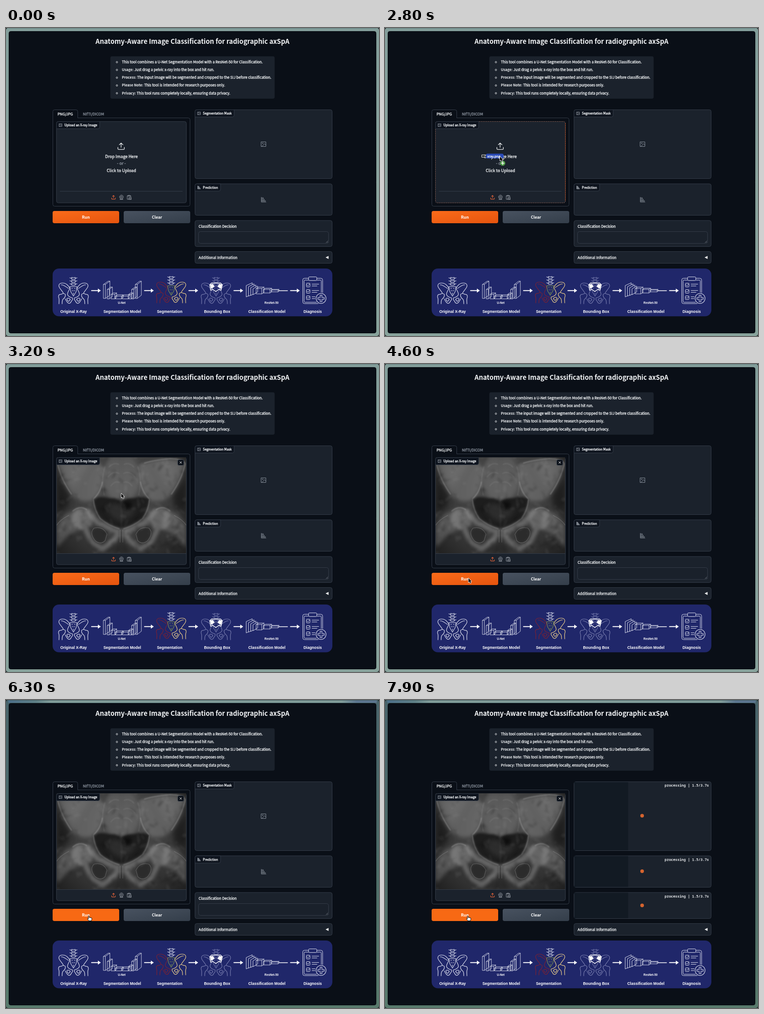
An HTML page with a canvas that plays this animation: 824x680 px, repeating every 8 s.

```html
<!DOCTYPE html>
<html lang="en">
<head>
<meta charset="utf-8">
<title>Image classification demo</title>
<style>
html, body { margin: 0; width: 100%; height: 100%; overflow: hidden; background: #0a0f17; }
canvas { display: block; width: 824px; height: 680px; }
</style>
</head>
<body>
<canvas id="stage" width="824" height="680"></canvas>
<script>
const canvas = document.getElementById('stage');
const ctx = canvas.getContext('2d');
const LOOP = 8000, STEP = 100;
const INK = '#f3f5f7', GREY = '#8b939e', BG = '#0a0f17', PANEL = '#1b222c', LINE = '#343c48', ORANGE = '#e2633a';
const NAVY = '#20276a', CHALK = '#dfe2f0';
const SANS = '"Noto Sans CJK JP", "Noto Sans CJK SC", "Noto Sans CJK", "Open Sans", sans-serif';
const MONO = '"Noto Sans Mono", "DejaVu Sans Mono", monospace';
const ARIAL = '"Liberation Sans", Arial, sans-serif';
const TITLE = 'Anatomy-Aware Image Classification for radiographic axSpA';

// Ratio between the UI type scale and the em size of the installed face
function emRatio(weight, sample, ems) {
  ctx.font = `${weight} 100px ${SANS}`;
  return ems * 100 / ctx.measureText(sample).width;
}
const RATIO = {
  500: emRatio(500, 'This tool runs completely locally, ensuring data privacy.', 23.18),
  600: emRatio(600, TITLE, 25.6)
};

const clamp = v => Math.max(0, Math.min(1, v));
const span = (t, a, b) => clamp((t - a) / (b - a));
const mix = (a, b, p) => a + (b - a) * p;
const easeOut = p => 1 - (1 - p) * (1 - p);
const easeInOut = p => p * p * (3 - 2 * p);

// A hairline outline gives light type its medium weight
function write(s, x, y, font, color, align, outline = 0) {
  ctx.font = font;
  ctx.fillStyle = ctx.strokeStyle = color;
  ctx.textAlign = align;
  ctx.fillText(s, x, y);
  if (!outline) return;
  ctx.lineWidth = outline;
  ctx.lineJoin = 'round';
  ctx.strokeText(s, x, y);
}
function text(s, x, y, size, color = INK, align = 'left', weight = 500) {
  write(s, x, y, `${weight} ${size * RATIO[weight]}px ${SANS}`, color, align, weight === 500 ? 0.35 : 0);
  return ctx.measureText(s).width;
}
function box(x, y, w, h, r, fill, stroke) {
  ctx.beginPath();
  ctx.roundRect(x, y, w, h, r);
  if (fill) { ctx.fillStyle = fill; ctx.fill(); }
  if (stroke) { ctx.strokeStyle = stroke; ctx.lineWidth = 1; ctx.stroke(); }
}
function disc(x, y, r, fill) {
  ctx.beginPath();
  ctx.arc(x, y, r, 0, 7);
  ctx.fillStyle = fill;
  ctx.fill();
}
function draw(d, x, y, scale, color, width, fill) {
  const p = new Path2D(d);
  ctx.save();
  ctx.translate(x, y);
  ctx.scale(scale, scale);
  ctx.lineJoin = ctx.lineCap = 'round';
  if (fill) { ctx.fillStyle = fill; ctx.fill(p); }
  if (color) { ctx.strokeStyle = color; ctx.lineWidth = width / scale; ctx.stroke(p); }
  ctx.restore();
}
const ICON = {
  upload: 'M21 15v4a2 2 0 0 1-2 2H5a2 2 0 0 1-2-2v-4M17 8l-5-5-5 5M12 3v12',
  image: 'M3 3h18v18H3zM7 8.5a1.5 1.5 0 1 0 3 0a1.5 1.5 0 1 0-3 0M21 15l-5-5L5 21',
  chart: 'M3 2v20h19M3 4h8v4H3M3 10h12v4H3M3 16h17v3H3',
  webcam: 'M3 10a9 9 0 1 0 18 0a9 9 0 1 0-18 0M8 10a4 4 0 1 0 8 0a4 4 0 1 0-8 0M7 18l-2 4h14l-2-4',
  paste: 'M8 4H3v17h7M16 4h4v6M8 2h8v4H8zM12 12h10v10H12zM12 20l4-4 5 5'
};
function icon(name, x, y, size, color, width = 0.9) {
  const k = size / 24;
  draw(ICON[name], x - size / 2, y - size / 2, k, color, width);
}

// X-ray picture, mirrored about the spine
function makeXray() {
  const c = document.createElement('canvas');
  c.width = 286; c.height = 212;
  const g = c.getContext('2d');
  const base = g.createRadialGradient(143, 60, 10, 143, 90, 185);
  base.addColorStop(0, '#525252');
  base.addColorStop(0.6, '#3a3a3a');
  base.addColorStop(1, '#202020');
  g.fillStyle = base;
  g.fillRect(0, 0, 286, 212);
  const both = (d, fill, stroke, width, blur) => {
    const p = new Path2D(d);
    g.filter = `blur(${blur}px)`;
    for (const side of [-1, 1]) {
      g.save();
      g.translate(143, 0);
      g.scale(side, 1);
      if (fill) { g.fillStyle = fill; g.fill(p); }
      if (stroke) { g.strokeStyle = stroke; g.lineWidth = width; g.stroke(p); }
      g.restore();
    }
  };
  const wing = 'M38 18Q65 6 108 3Q136 4 141 14Q134 48 110 82Q90 104 62 94Q46 80 42 54Z';
  const cavity = 'M0 98Q10 90 26 90Q46 84 62 92Q58 116 46 134Q26 150 0 156Z';
  const head = 'M62 136a24 24 0 1 0 48 0a24 24 0 1 0-48 0';
  const hole = 'M32 170Q40 152 60 156Q72 166 58 184Q46 194 36 184Z';
  both('M143 45L114 84L116 108L143 122Z', 'rgba(18,18,18,.6)', null, 0, 6);
  both(wing, 'rgba(150,150,150,.38)', null, 0, 4);
  both('M70 12Q104 6 136 12Q126 44 104 70Q92 40 70 12', 'rgba(160,160,160,.2)', null, 0, 8);
  both('M0 0H26L44 34L38 70L20 94H0Z', 'rgba(150,150,150,.24)', null, 0, 4);
  both('M92 112L124 126L143 150V200L118 172L90 158Z', 'rgba(150,150,150,.36)', null, 0, 4);
  both(head, 'rgba(160,160,160,.4)', null, 0, 3);
  both('M4 165L28 156L54 143L76 116M6 168L20 186L42 202L66 186L80 158', null, 'rgba(150,150,150,.45)', 11, 3);
  both(cavity, '#1d1d1d', null, 0, 2.5);
  both('M0 104Q18 98 32 112Q22 136 0 142Z', 'rgba(80,80,80,.35)', null, 0, 6);
  both(hole, '#2b2b2b', null, 0, 3);
  both('M0 182L14 196L20 212H0Z', 'rgba(30,30,30,.6)', null, 0, 4);
  both('M62 93Q60 116 47 135Q28 151 4 158M50 13Q72 6 108 3Q137 4 141 14Q134 48 110 82M76 116Q92 105 108 119M42 54Q46 78 62 92', null, 'rgba(205,205,205,.42)', 1.6, 0.8);
  both(hole + 'M3 160V188M116 128Q136 138 143 150', null, 'rgba(190,190,190,.28)', 1.2, 0.7);
  both('M5 16Q17 10 28 22M4 36Q18 28 30 44M4 56Q14 50 24 64M36 20Q46 50 38 84', null, 'rgba(190,190,190,.16)', 2, 1.2);
  g.filter = 'blur(4px)';
  g.fillStyle = '#0d0d0d';
  g.beginPath();
  g.ellipse(156, 106, 12, 10, 0, 0, 7);
  g.fill();
  // Soft seeded mottling
  g.filter = 'blur(2px)';
  let seed = 7;
  const rand = () => (seed = seed * 16807 % 2147483647) / 2147483647;
  for (let i = 0; i < 240; i++) {
    g.fillStyle = i % 2 ? 'rgba(210,210,210,.07)' : 'rgba(0,0,0,.12)';
    g.beginPath();
    g.ellipse(rand() * 286, rand() * 212, 2 + rand() * 8, 1 + rand() * 3, rand() * 3, 0, 7);
    g.fill();
  }
  return c;
}
const xray = makeXray();

function backdrop(focused) {
  ctx.fillStyle = '#1a2427';
  ctx.fillRect(0, 0, 824, 680);
  const wall = ctx.createLinearGradient(0, 0, 0, 680);
  wall.addColorStop(0, focused ? '#48636a' : '#829d9a');
  wall.addColorStop(0.5, focused ? '#4d6b68' : '#8ba49f');
  wall.addColorStop(1, focused ? '#587a6c' : '#87a29b');
  box(0, 0, 824, 680, 5, wall);
  if (focused) {
    const sky = ctx.createLinearGradient(0, 0, 824, 0);
    sky.addColorStop(0.01, '#4d708b');
    sky.addColorStop(0.08, '#5f8087');
    sky.addColorStop(0.12, '#829d9a');
    sky.addColorStop(0.9, '#829d9a');
    sky.addColorStop(0.94, '#5c7590');
    ctx.fillStyle = sky;
    ctx.fillRect(5, 1, 814, 5);
  }
  ctx.fillStyle = focused ? '#3f585c' : '#5f7a7b';
  ctx.fillRect(5, 0, 814, 1);
  box(6.5, 7.5, 811, 666, 4, BG, '#04070c');
}

function intro() {
  text(TITLE, 412, 34.5, 16.75, INK, 'center', 600);
  box(230.5, 62.5, 363, 93.5, 4, PANEL);
  const rows = [
    ['', 'This tool combines a U-Net Segmentation Model with a ResNet-50 for Classification.'],
    ['Usage:', ' Just drag a pelvic x-ray into the box and hit run.'],
    ['Process:', ' The input image will be segmented and cropped to the SIJ before classification.'],
    ['Please Note:', ' This tool is intended for research purposes only.'],
    ['Privacy:', ' This tool runs completely locally, ensuring data privacy.']
  ];
  rows.forEach(([head, body], i) => {
    const y = 78 + i * 17.15;
    ctx.beginPath();
    ctx.arc(245, y - 2.6, 1.7, 0, 7);
    ctx.strokeStyle = INK;
    ctx.lineWidth = 0.9;
    ctx.stroke();
    const w = text(head, 256, y, 8.93, INK, 'left', 600);
    text(body, 256 + w, y, 8.93);
  });
}

function label(s, name, x, y, w) {
  box(x, y, w, 16, [4, 0, 4, 0], '#0e141e', LINE);
  icon(name, x + 9, y + 8, 8, '#a3a9b2', 0.8);
  text(s, x + 17.5, y + 10.8, 7.7);
}

// Corner-to-corner gradient, as CSS "to bottom right" lays it out
function button(s, x, y, from, to) {
  const w = 147, h = 27, k = w * h / (w * w + h * h) / 2;
  const cx = x + w / 2, cy = y + h / 2;
  const g = ctx.createLinearGradient(cx - h * k * 2, cy - w * k * 2, cx + h * k * 2, cy + w * k * 2);
  g.addColorStop(0, from);
  g.addColorStop(1, to);
  box(x, y, w, h, 4, g);
  text(s, cx, y + 17.3, 10.2, '#fff', 'center', 600);
}

function inputSide(state, hover, focused) {
  const height = { empty: 180, loading: 25, ready: 237 }[state];
  const end = 206 + height;
  ctx.strokeStyle = LINE;
  ctx.lineWidth = 1;
  ctx.beginPath();
  ctx.roundRect(103.5, 180.5, 55, 22, [4, 4, 0, 0]);
  ctx.stroke();
  box(103.5, 198.5, 303, end - 191, [0, 4, 4, 4], BG, LINE);
  ctx.fillStyle = BG;
  ctx.fillRect(104, 197, 54, 3);
  text('PNG/JPG', 114, 192.7, 8.93);
  text('NIfTI/DICOM', 170, 192.7, 8.93, GREY);

  box(111.5, 206.5, 287, height - 0.5, 4, PANEL, hover ? null : LINE);
  if (state === 'empty') {
    icon('upload', 254.3, 261, 19, INK, 1.3);
    text('Drop Image Here', 255, 286.6, 10.2, INK, 'center');
    text('- or -', 255, 302.2, 10.2, GREY, 'center');
    text('Click to Upload', 255, 317.6, 10.2, INK, 'center');
    ctx.fillStyle = LINE;
    ctx.fillRect(119, 360, 271, 1);
  }
  if (state === 'ready') {
    ctx.drawImage(xray, 112, 206);
    ctx.fillStyle = LINE;
    ctx.fillRect(112, 418, 286, 1);
  }
  if (hover) {
    ctx.setLineDash([2.5, 1.5]);
    box(111.5, 206.5, 287, height - 0.5, 4, null, '#8f6558');
    ctx.beginPath();
    ctx.moveTo(398.5, 210);
    ctx.lineTo(398.5, end - 4);
    ctx.strokeStyle = '#ea642d';
    ctx.stroke();
    ctx.setLineDash([]);
  }
  label('Upload an X-ray Image', 'image', 111.5, 206.5, 95.5);
  icon('upload', 237.5, end - 12.3, 11, ORANGE, 1.1);
  icon('webcam', 255, end - 12, 11, '#a3a9b2');
  icon('paste', 272, end - 12, 11, '#a3a9b2');
  if (state !== 'empty') {
    box(379.5, 211.5, 13, 12, 2.5, '#0b1018', LINE);
    draw('M-2-2L2 2M2-2L-2 2', 386, 217.5, 1, INK, 1);
  }
  button('Run', 103, end + 18, focused ? '#f76914' : '#fa6b1a', focused ? '#f76914' : '#e5540e');
  button('Clear', 260, end + 18, '#485260', '#343e4a');
}

function progress(y, h, iconY, elapsed) {
  box(417.5, y, 303, h, 4, PANEL, LINE);
  ctx.fillStyle = '#121a23';
  ctx.fillRect(418, y + 0.5, 302 * elapsed / 3.7, h - 1);
  write(`processing | ${elapsed.toFixed(1)}/3.7s`, 715.5, y + 10.5, `500 7.75px ${MONO}`, INK, 'right', 0.3);
  disc(568, iconY, 4, '#d5642f');
}

function outputSide(elapsed) {
  if (elapsed > 0) {
    progress(180.5, 152, 255.5, elapsed);
    progress(344, 69.5, 378, elapsed);
    progress(425, 57.5, 453.5, elapsed);
  } else {
    box(417.5, 180.5, 303, 152, 4, PANEL, LINE);
    label('Segmentation Mask', 'image', 417.5, 180.5, 86.5);
    icon('image', 569, 256.5, 13.5, GREY, 1);
    box(417.5, 344, 303, 69.5, 4, PANEL, LINE);
    label('Prediction', 'chart', 417.5, 344, 56.5);
    icon('chart', 569, 379, 13, GREY, 0.8);
    box(417.5, 425, 303, 57.5, 4, PANEL, LINE);
    text('Classification Decision', 425.5, 440.6, 8.97);
    box(425.5, 449.5, 287, 26, 4, '#1a212b', LINE);
    draw('M707 474l4-4M709.5 474l1.5-1.5', 0, 0, 1, '#8a9099', 0.7);
  }
  box(417.5, 493.5, 303, 26, 4, PANEL, LINE);
  text('Additional Information', 425.5, 509.6, 8.97);
  draw('M712.5 503.2V510L706 506.6Z', 0, 0, 1, null, 0, '#fff');
}

const WING = 'M8-6C12-12 16-17 24-17C31-17 34-13 31-7C28-2 24 1 22 6M8-6C9 0 14 3 13 9M11-5C16-8 21-13 27-13';
const RING = 'M13 9C11 13 6 15 2 16V20C4 21 5 25 7 27C11 30 15 25 18 18M7 19C11 15 16 16 14 20C12 25 9 24 7 19';
const FEMUR = 'M22 6C25 6 27 9 29 8C33 8 34 13 32 17C31 21 32 25 32 29M18 11C18 16 22 17 24 20C25 23 25 26 25 29M22 6C18 7 17 9 18 11';
const SACRUM = 'M-8-9H8L6 2L0 12L-6 2ZM-4-5h2M2-5h2M-3 0h2M1 0h2M0 5v3';
function pelvis(x, y, left, right, spine, sacrum) {
  for (const [side, color] of [[-1, left], [1, right]]) {
    ctx.save();
    ctx.translate(x, y);
    ctx.scale(side, 1);
    draw(WING + RING + FEMUR, 0, 0, 1, color, 1.2);
    ctx.restore();
  }
  for (let i = 0; i < 3; i++) {
    draw('M-4-2.5Q0-1 4-2.5V1.5Q0 3-4 1.5ZM-4 0L-8-1.5M4 0L8-1.5', x, y - 27 + i * 6.5, 1, spine, 1.1);
  }
  draw(SACRUM, x, y, 1, sacrum, 1.1);
}

function slab(x, y, w, h, dx, dy) {
  draw(`M0 0h${w}v${h}h${-w}zM0 0l${dx} ${-dy}h${w}l${-dx} ${dy}M${w} ${h}l${dx} ${-dy}v${-h}`, x, y, 1, CHALK, 0.9);
}

function banner() {
  box(103, 531, 618, 105.5, 14, NAVY);
  const names = [
    ['Original X-Ray', 149.3], ['Segmentation Model', 256.7], ['Segmentation', 361.5],
    ['Bounding Box', 466.5], ['Classification Model', 576.3], ['Diagnosis', 677.5]
  ];
  for (const [s, x] of names) write(s, x, 628.7, `bold 8.5px ${ARIAL}`, '#fff', 'center');
  write('U-Net', 255.7, 608.5, `bold 6.3px ${ARIAL}`, '#fff', 'center');
  write('ResNet-50', 586.5, 608.5, `bold 6.3px ${ARIAL}`, '#fff', 'center');
  for (const x of [189, 306, 404, 503.5, 628.5]) {
    draw('M0 0H15', x, 579.7, 1, '#fff', 2);
    draw('M14-4.5L20.5 0L14 4.5Z', x, 579.7, 1, null, 0, '#fff');
  }
  pelvis(149, 580, CHALK, CHALK, CHALK, CHALK);
  pelvis(365, 578, '#7e2030', '#f0d28b', CHALK, '#83994f');
  pelvis(464, 580, '#777cae', '#777cae', '#777cae', '#777cae');
  draw('M450 567L454 563H474L478 567L475 579L470 577L463.5 582L457 577L452 579Z', 0, 0, 1, '#fff', 1.5);
  draw('M451 566L457 565L461 571L453 576ZM477 566L471 565L467 571L475 576Z', 0, 0, 1, null, 0, '#fff');

  // U-shaped network: tall slabs outside, low blocks in the middle
  slab(215.5, 566, 4, 31, 10, 7);
  slab(224, 577, 4, 21, 7, 5);
  slab(232.5, 588, 8, 10, 4, 3);
  slab(242, 592, 13, 6, 4, 3);
  slab(257, 592, 13, 6, 4, 3);
  slab(271, 588, 6, 10, 4, 3);
  slab(278, 577, 4, 21, 7, 5);
  slab(286, 566, 4, 31, 9, 7);

  for (let i = 0; i < 4; i++) {
    const h = 25 - i * 4;
    draw(`M0 ${-h / 2}l${13 - i} -6v${h}l${i - 13} 6z`, 531 + i * 5, 581 + i * 0.4, 1, CHALK, 1, NAVY);
  }
  slab(553, 575, 12, 12, 5, 3);
  slab(569, 577, 14, 8, 4, 2.5);
  slab(586, 578.5, 15, 4, 2, 1.5);
  draw('M603 580H622', 0, 0, 1, '#fff', 1.5);

  box(655.5, 552.5, 44, 56, 4, null, CHALK);
  box(658.5, 556.5, 38, 49, 2, null, CHALK);
  box(668.5, 549.5, 18, 8, 2, NAVY, CHALK);
  for (const y of [563, 577, 591]) {
    box(663.5, y + 0.5, 8, 8, 1, null, CHALK);
    draw('M665 4l2 2 4-4M676 2.5h15M676 6.5h11', 0, y, 1, CHALK, 1);
  }
  disc(696, 597, 13, NAVY);
  draw('M685 597a11 11 0 1 0 22 0a11 11 0 1 0-22 0M694 590h4v5h5v4h-5v5h-4v-5h-5v-4h5z', 0, 0, 1, CHALK, 1.1);
}

const ARROW = 'M0 0V9.2L2.1 7.3L3.8 11L5.5 10.2L3.9 6.7H6.6Z';
function arrow(x, y) {
  draw(ARROW, x, y, 1, '#fff', 1.6);
  draw(ARROW, x, y, 1, null, 0, '#000');
}
function hand(x, y) {
  draw('M0 6V1Q1-.8 2 1V4Q3 3 4 4Q5 3.3 6 4.5Q7.5 4 7.5 6V8L6.5 11H1L-2 7Q-2 5 0 6.5Z', x, y, 1, '#000', 1, '#fff');
}

function dragged(x, y, p) {
  const px = x - mix(21, 31, p), py = y - mix(1.5, 6.5, p);
  ctx.save();
  ctx.globalAlpha = mix(0.4, 1, p);
  box(px, py, 39, 10.5, 3.5, '#2a4bb8');
  text('xray.png', px + 3, py + 8, 8, '#fff');
  ctx.restore();
  box(px - 9.5, py + 2.5, 7.5, 5.5, 0.5, '#363a3c', '#d8d8d2');
}

function render(t) {
  const focused = t >= 5500;
  const state = t < 2900 ? 'empty' : t < 3100 ? 'loading' : 'ready';
  const dragging = t >= 1500 && t < 2900;
  backdrop(focused);
  intro();
  inputSide(state, t >= 1700 && t < 2900, focused);
  outputSide(t >= 6500 ? (t - 6440) / 1000 : 0);
  banner();
  if (t < 1500) return;
  if (dragging) {
    const p = easeOut(span(t, 1500, 2400));
    const x = mix(370, 254, p), y = mix(327.7, 284, p);
    dragged(x, y, span(t, 1500, 2000));
    disc(x + 6, y + 14.5, 5.8, '#4d9a45');
    draw('M-3 0H3M0-3V3', x + 6, y + 14.5, 1, '#fff', 1.6);
    arrow(x, y);
  } else if (focused) {
    hand(182, 476.5);
  } else {
    const p = easeInOut(span(t, 3400, 4300));
    arrow(mix(254.7, 184.5, p), mix(286, 473, p));
  }
}

const start = performance.now();
let shown = -1;
function tick() {
  const t = Math.floor((performance.now() - start) % LOOP / STEP) * STEP;
  if (t !== shown) render(shown = t);
  requestAnimationFrame(tick);
}
render(0);
requestAnimationFrame(tick);
</script>
</body>
</html>
```
